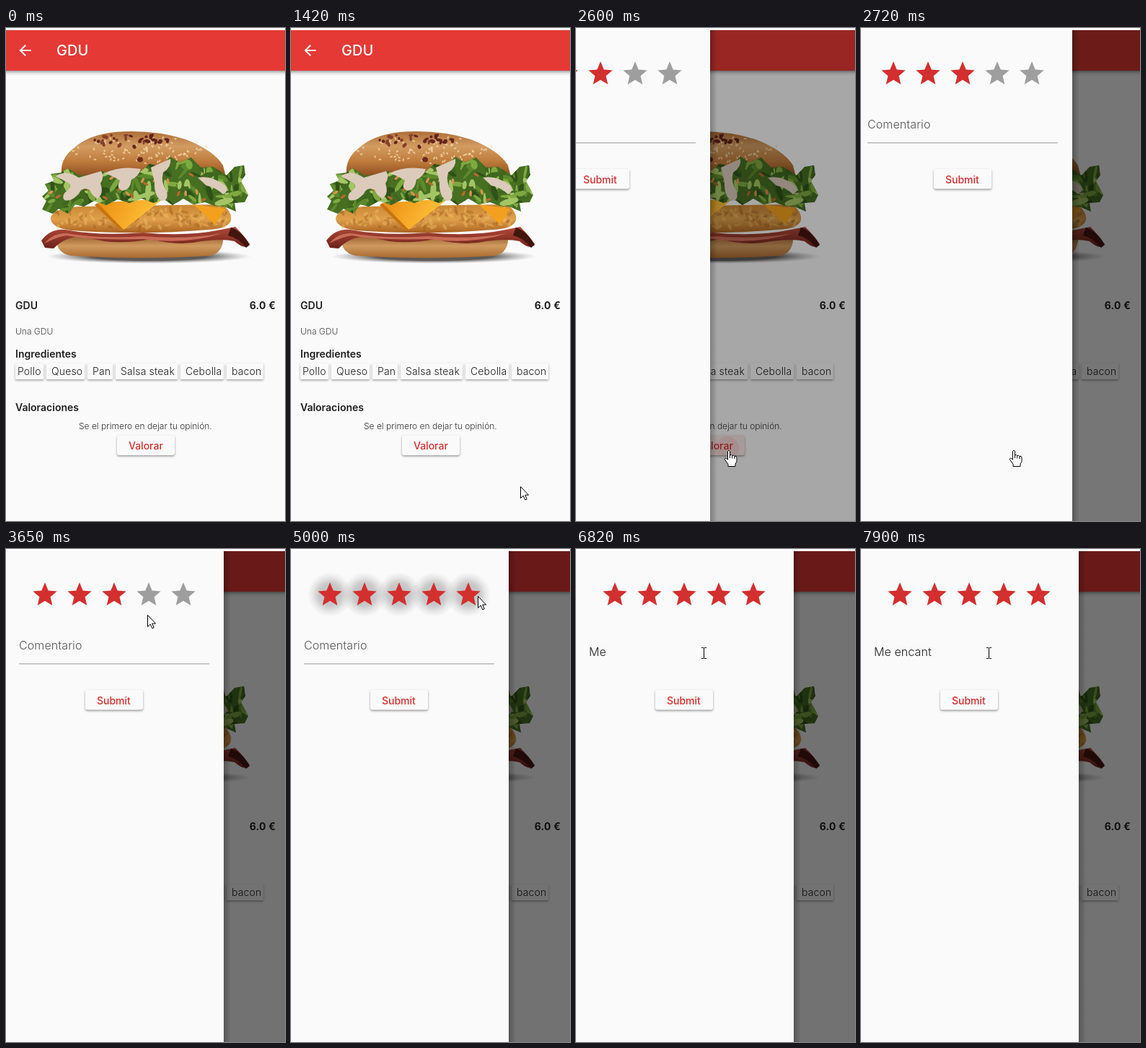
An HTML page with a canvas that plays this animation: 387 by 682 pixels, repeating every 8 s.

```html
<!DOCTYPE html>
<html lang="es">
<head>
<meta charset="utf-8">
<title>Valoraciones</title>
<style>
html, body { margin: 0; width: 100%; height: 100%; overflow: hidden; background: #fff; }
canvas { display: block; width: 387px; height: 682px; }
</style>
</head>
<body>
<canvas id="stage"></canvas>
<script>
const W = 387, H = 682, LOOP = 8000, DRAWER = 302, TOP = 3;
const RED = '#d32f2f', PAPER = '#fafafa', INK = '#212121';
const canvas = document.getElementById('stage');
const ctx = canvas.getContext('2d');
const dpr = window.devicePixelRatio || 1;
canvas.width = W * dpr;
canvas.height = H * dpr;

// Stepped timelines: [start ms, value...]
const pointer = [
  [0, 0, 0, ''],
  [1030, 353, 652, 'arrow'], [1150, 349, 650, 'arrow'], [1270, 341, 647, 'arrow'],
  [1420, 318, 634, 'arrow'], [1540, 285, 617, 'arrow'], [1660, 252, 603, 'arrow'],
  [1780, 223, 591, 'arrow'], [1930, 215, 586, 'hand'], [2050, 212, 584, 'hand'],
  [2990, 190, 450, 'arrow'], [3110, 153, 305, 'arrow'], [3230, 133, 228, 'arrow'],
  [3380, 153, 160, 'arrow'], [3500, 175, 107, 'arrow'], [3650, 196, 91, 'arrow'],
  [3770, 203, 83, 'arrow'], [3920, 203, 79, 'arrow'], [4040, 202, 75, 'arrow'],
  [4160, 201, 72, 'arrow'], [4310, 209, 70, 'arrow'], [4460, 223, 68, 'arrow'],
  [4610, 235, 66, 'arrow'], [4730, 246, 65, 'arrow'], [4880, 255, 65, 'arrow'],
  [5000, 259, 65, 'arrow'], [5150, 218, 116, 'arrow'], [5270, 171, 165, 'arrow'],
  [5420, 172, 166, 'arrow'], [5570, 177, 152, 'beam'], [5690, 176, 144, 'beam'],
  [5990, 177, 144, 'beam']
];
const slide = [[0, 0], [2600, 0.616], [2720, 0.97], [2840, 1]];
const rating = [[0, 3], [4310, 4], [4610, 4.5], [4880, 5]];
const typed = [[0, ''], [6700, 'M'], [6820, 'Me'], [7230, 'Me en'], [7380, 'Me enc'],
  [7660, 'Me enca'], [7780, 'Me encan'], [7900, 'Me encant']];

const at = (list, t) => list.filter(k => k[0] <= t).pop().slice(1);

const shapes = {
  back: new Path2D('M20 11H7.83l5.59-5.59L12 4l-8 8 8 8 1.41-1.41L7.83 13H20z'),
  star: new Path2D('M12 17.27L18.18 21l-1.64-7.03L22 9.24l-7.19-.61L12 2 9.19 8.63 2 9.24l5.46 4.73L5.82 21z'),
  arrow: new Path2D('M.5.5V16.5L4.2 13 6.8 18.8 9.2 17.8 6.7 12.1H11.5z'),
  hand: new Path2D('M-1.5 1.5Q0-1 1.5 1.5V7Q3.4 5.6 4.6 7.6 6.6 6.4 7.8 8.4 10.6 7.6 11 10.5V15.5L9 19V22.5H-1V19.5L-5.8 12.6Q-5.4 9.6-1.5 13z')
};

function fill(path, color) {
  ctx.fillStyle = color;
  ctx.fill(typeof path === 'string' ? new Path2D(path) : path);
}

function rect(x, y, w, h, color) {
  ctx.fillStyle = color;
  ctx.fillRect(x, y, w, h);
}

function ramp(x0, y0, x1, y1, ...colors) {
  const g = ctx.createLinearGradient(x0, y0, x1, y1);
  colors.forEach((c, i) => g.addColorStop(i / (colors.length - 1), c));
  return g;
}

function label(str, x, y, size, weight, color, spacing = 0) {
  ctx.font = `${weight} ${size}px Inter, sans-serif`;
  ctx.letterSpacing = spacing + 'px';
  ctx.fillStyle = color;
  ctx.fillText(str, x, y);
}

function dot(x, y, rx, ry, turn, color) {
  ctx.fillStyle = color;
  ctx.beginPath();
  ctx.ellipse(x, y, rx, ry, turn, 0, Math.PI * 2);
  ctx.fill();
}

function card(x, y, w, h, r, alpha) {
  ctx.save();
  ctx.shadowColor = `rgba(0,0,0,${alpha})`;
  ctx.shadowBlur = 3 * dpr;
  ctx.shadowOffsetY = 1.5 * dpr;
  ctx.fillStyle = PAPER;
  ctx.beginPath();
  ctx.roundRect(x, y, w, h, r);
  ctx.fill();
  ctx.restore();
}

function seeded(seed) {
  return () => (seed = seed * 16807 % 2147483647) / 2147483647;
}

function burger() {
  const rnd = seeded(77);
  ctx.save();
  ctx.translate(198, 316);
  ctx.scale(1, 0.07);
  const shade = ctx.createRadialGradient(0, 0, 80, 0, 0, 142);
  shade.addColorStop(0, 'rgba(40,36,34,.75)');
  shade.addColorStop(1, 'rgba(120,120,120,0)');
  dot(0, 0, 142, 142, 0, shade);
  ctx.restore();

  // Lower bun, bacon, chicken and cheese
  fill('M70 288Q68 311 90 315 190 321 284 315 303 310 301 286Z', ramp(0, 285, 0, 318, '#8e5426', '#cf9a5f', '#a9692f'));
  fill('M49 294Q62 277 82 279 130 288 190 283 250 289 298 279L318 275Q331 288 338 299 332 308 317 295 300 291 271 295 240 302 200 292 150 302 111 289 85 286 66 305L54 304Z',
    ramp(0, 275, 0, 304, '#b14a3a', '#6e2219'));
  fill('M53 298Q66 283 84 284 130 292 190 288 250 293 300 284 250 300 190 292 120 294 84 287 68 290 53 298Z', '#c96c58');
  fill('M312 276Q326 280 338 300L333 304Q322 290 308 287Z', '#43150f');
  fill('M62 263Q64 250 100 247L300 244Q314 255 312 266 308 278 280 279 190 287 90 280 62 276 62 263Z', ramp(0, 245, 0, 284, '#c98734', '#dfa04b', '#a8621f'));
  for (let i = 0; i < 110; i++) {
    const x = 68 + rnd() * 238, y = 251 + rnd() * 25;
    dot(x, y, 2 + rnd() * 4, 1 + rnd() * 1.5, rnd() * 3, rnd() < 0.5 ? 'rgba(240,190,103,.45)' : 'rgba(151,83,24,.35)');
  }
  fill('M127 242L163 279 218 236Z', ramp(130, 240, 190, 275, '#e98e13', '#ffbe36'));
  fill('M260 244L290 272 304 250Z', '#f2a01e');
  fill('M127 242L163 279 159 280 123 245Z', '#c87410');

  // Crown
  fill('M77 202Q75 181 93 167 113 148 151 144 204 140 249 154 288 169 301 190L305 206Q190 216 77 202Z',
    ramp(0, 143, 0, 205, '#ad6e38', '#d29c61', '#bf7c3c', '#8e4e20'));
  for (let i = 0; i < 85; i++) {
    const a = rnd() * Math.PI * 2, r = Math.sqrt(rnd());
    const x = 188 + Math.cos(a) * r * 96, y = 169 + Math.sin(a) * r * 19;
    dot(x, y, 2, 1.1, rnd() * 3, 'rgba(244,216,169,.75)');
  }
  for (let i = 0; i < 32; i++) {
    const x = 117 + rnd() * 108, y = 148 + rnd() * 17;
    dot(x, y, 2 + rnd() * 2, 1.5 + rnd(), rnd() * 3, rnd() < 0.5 ? '#64251b' : '#86402b');
  }
  dot(186, 182, 4, 3.5, 0, '#6b2a1d');

  // Lettuce
  const leaves = new Path2D('M50 251L56 239 50 233 59 225 54 216 67 211 62 202 77 200 86 194 102 204 118 203 133 198 149 203 168 195 186 199 199 188 215 192 228 178 241 186 257 179 270 193 287 192 306 204 317 192 330 190 332 203 326 212 336 231 331 241 317 242 319 254 303 247 289 246 276 241 260 244 246 236 231 245 219 237 205 242 188 236 171 242 155 237 139 245 122 239 108 247 96 244 86 257 73 250 65 257Z');
  fill(leaves, '#466f22');
  ctx.save();
  ctx.clip(leaves);
  const greens = ['#2f5218', '#5c8a2b', '#7fa941', '#a4c565', '#3f671f'];
  for (let i = 0; i < 170; i++) {
    const x = 50 + rnd() * 286, y = 184 + rnd() * 72;
    dot(x, y, 5 + rnd() * 10, 1.5 + rnd() * 3.5, rnd() * 3 - 1, greens[i % 5]);
  }
  ctx.restore();

  // Crisp onion and sauce
  for (let i = 0; i < 22; i++) {
    dot(62 + i * 10 + rnd() * 8, 201 + rnd() * 38, 4, 1.8, rnd() * 3, i % 2 ? '#b56b2c' : '#d3944d');
  }
  const sauce = '#dccbbb';
  fill('M69 205Q83 195 101 207L132 198Q137 206 131 215 136 229 127 236 119 232 116 224 106 219 101 229 91 241 81 238 76 231 85 225 94 217 84 213Z', sauce);
  fill('M137 201Q157 190 187 195 184 205 174 210 172 224 162 225 152 222 158 211 147 204 137 201Z', sauce);
  fill('M201 193L228 181Q230 192 218 200 214 213 223 226 226 240 215 239 205 231 206 213Z', sauce);
  fill('M266 207Q285 203 304 218 310 225 301 230 290 220 278 218Z', sauce);
}

function button(str, x, y) {
  card(x, y, 80, 27.5, 3, 0.4);
  label(str, x + 16, y + 19.5, 14, 500, RED);
}

function page(t) {
  rect(0, 0, W, H, PAPER);
  rect(0, 0, W, TOP, '#fff');
  rect(0, 59, W, 7, ramp(0, 59, 0, 66, 'rgba(0,0,0,.36)', 'rgba(0,0,0,.1)', 'rgba(0,0,0,0)'));
  rect(0, TOP, W, 56, '#e53935');
  ctx.save();
  ctx.translate(14.5, 19);
  fill(shapes.back, '#fff');
  ctx.restore();
  label('GDU', 70, 38, 20, 500, '#fff');

  burger();

  label('GDU', 13, 389, 14, 600, INK, 0.1);
  ctx.textAlign = 'right';
  label('6.0 €', 374, 389, 14, 700, INK, 0.2);
  ctx.textAlign = 'left';
  label('Una GDU', 13, 424, 12, 300, '#444');
  label('Ingredientes', 13, 456, 14, 600, INK);
  const chips = [['Pollo', 13, 52, 16], ['Queso', 56, 109, 63], ['Pan', 113, 148, 120],
    ['Salsa steak', 152, 238, 159], ['Cebolla', 242, 302, 249], ['bacon', 306, 357, 313]];
  for (const [str, left, right, x] of chips) {
    card(left, 464, right - left, 22, 1, 0.36);
    label(str, x, 480, 14, 300, INK, 0.15);
  }
  label('Valoraciones', 13, 530, 14, 600, INK);
  label('Se el primero en dejar tu opinión.', 101, 555, 12, 300, '#333');

  button('Valorar', 154, 563.5);
  if (t >= 1930) {
    ctx.save();
    ctx.beginPath();
    ctx.roundRect(154, 563.5, 80, 27.5, 3);
    ctx.clip();
    rect(154, 563, 80, 29, `rgba(229,57,53,${t < 2480 ? 0.04 : 0.1})`);
    if (t >= 2480) dot(210, 581, 16, 16, 0, 'rgba(229,57,53,.1)');
    ctx.restore();
  }
}

function stars(score, glow) {
  for (let i = 0; glow && i < 5; i++) {
    const x = 54 + i * 48;
    const g = ctx.createRadialGradient(x, 63, 0, x, 63, 31);
    g.addColorStop(0, 'rgba(0,0,0,.24)');
    g.addColorStop(0.5, 'rgba(0,0,0,.2)');
    g.addColorStop(0.78, 'rgba(0,0,0,.07)');
    g.addColorStop(1, 'rgba(0,0,0,0)');
    dot(x, 63, 31, 31, 0, g);
  }
  for (let i = 0; i < 5; i++) {
    const part = Math.min(1, Math.max(0, score - i));
    ctx.save();
    ctx.translate(34 + i * 48, 43);
    ctx.scale(40 / 24, 40 / 24);
    if (part < 1) fill(shapes.star, '#9e9e9e');
    if (part > 0) {
      ctx.beginPath();
      ctx.rect(0, 0, 24 * part, 24);
      ctx.clip();
      fill(shapes.star, RED);
    }
    ctx.restore();
  }
}

function field(t) {
  if (t < 5570) label('Comentario', 18, 139, 16, 300, '#555', 0.1);
  if (t < 5840) return rect(18, 158, 264, 1.6, '#bcbfbc');
  if (t >= 6700) return label(at(typed, t)[0], 18, 148, 16, 300, INK, 0.1);
  label('Dinos tu opinión', 18, 148, 16, 300, '#555', 0.1);
  if (t < 6270) rect(18, 134, 2.2, 18, PAPER);
}

function drawer(t) {
  const [open] = at(slide, t);
  if (!open) return;
  rect(0, TOP, W, H, `rgba(0,0,0,${0.54 * open})`);
  ctx.save();
  ctx.translate(Math.round(DRAWER * (open - 1)), 0);
  rect(DRAWER, TOP, 10, H, ramp(DRAWER, 0, DRAWER + 10, 0, 'rgba(0,0,0,.25)', 'rgba(0,0,0,0)'));
  rect(0, TOP, DRAWER, H, PAPER);
  stars(at(rating, t)[0], t >= 4310 && t < 5150);
  field(t);
  button('Submit', 110, 195);
  ctx.restore();
}

function cursor(t) {
  const [x, y, kind] = at(pointer, t);
  if (!kind) return;
  ctx.save();
  ctx.translate(x, y);
  if (kind === 'beam') {
    rect(-3, -8, 3, 1, '#000');
    rect(1, -8, 3, 1, '#000');
    rect(0, -7, 1, 14, '#000');
    rect(-3, 7, 3, 1, '#000');
    rect(1, 7, 3, 1, '#000');
  } else {
    fill(shapes[kind], '#fff');
    ctx.strokeStyle = '#000';
    ctx.lineWidth = 1;
    ctx.lineJoin = 'round';
    ctx.stroke(shapes[kind]);
    if (kind === 'hand') ctx.stroke(new Path2D('M1.5 7V11M4.6 8V11.5M7.8 9V12'));
  }
  ctx.restore();
}

const start = performance.now();
function draw() {
  const t = (performance.now() - start) % LOOP;
  ctx.setTransform(dpr, 0, 0, dpr, 0, 0);
  page(t);
  drawer(t);
  cursor(t);
  requestAnimationFrame(draw);
}
draw();
</script>
</body>
</html>
```
